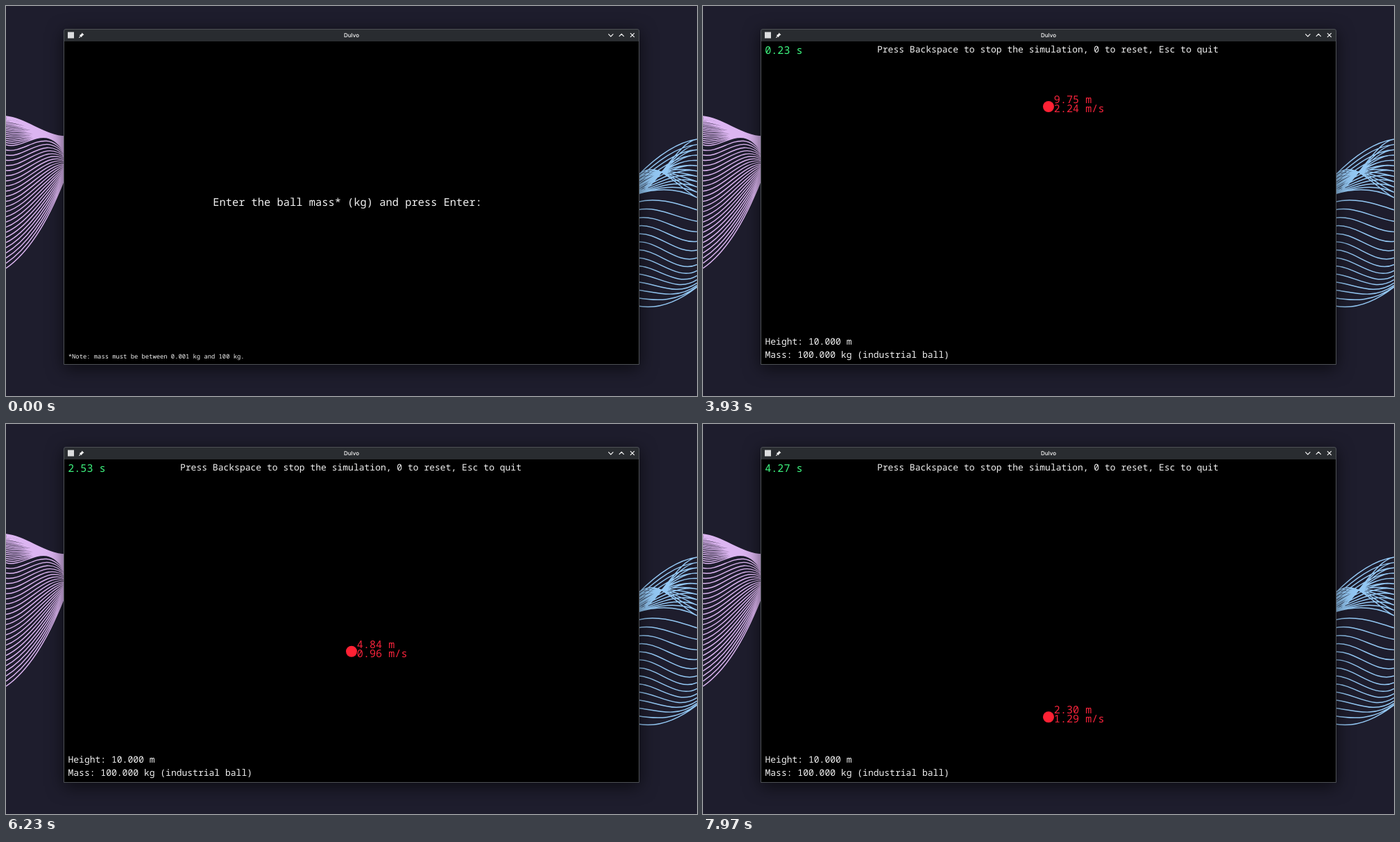
An HTML page that plays this animation: 996 px wide and 562 px high, repeating every 8 s.

```html
<!DOCTYPE html>
<html lang="en">
<head>
<meta charset="utf-8">
<title>Falling ball</title>
<style>
  html, body { margin: 0; width: 100%; height: 100%; overflow: hidden; background: #1e1d2d; }
  #stage { position: relative; width: 996px; height: 562px; overflow: hidden; }
  #window {
    position: absolute; left: 83px; top: 33px; width: 828px; height: 482px;
    border: 1px solid #4d5055; border-radius: 3px 3px 0 0;
    background: linear-gradient(#292c30 17px, #000 17px);
    box-shadow: 0 5px 24px rgba(0, 0, 0, .62);
  }
  svg { position: absolute; left: 0; top: 0; }
  text { font-family: "Roboto Mono", "Noto Sans Mono", monospace; fill: #f2f2f2; white-space: pre; text-rendering: geometricPrecision; }
  .title { font: 500 8px Inter, sans-serif; fill: #fcfcfc; text-anchor: middle; }
  .big { font-size: 15.4px; }
  .mid { font-size: 13.03px; }
  .small { font-size: 8.82px; }
  .readout { font-size: 15.15px; }
  #clock { fill: #3df57f; }
  #ball text { fill: #f5233b; }
  .wave { fill: none; stroke-width: 1.45; }
  .icon { fill: none; stroke: #fcfcfc; stroke-width: 1.1; }
</style>
</head>
<body>
<div id="stage">
  <svg width="996" height="562">
    <path id="lilac" class="wave" stroke="#dcb5f1"/>
    <path id="blue" class="wave" stroke="#93c7f3"/>
  </svg>
  <div id="window"></div>
  <svg width="996" height="562">
    <rect x="89" y="37.5" width="9" height="9" fill="#dcddde"/>
    <path d="M109.5 38.5l3 3-1.4.4-1.7 1.8-.4 1.5-3.2-3.2 1.5-.4 1.8-1.7z" fill="#fcfcfc"/>
    <path class="icon" d="M107.7 43.3L105.4 45.6M868.3 40.4l3.5 3.5 3.5-3.5M883.7 43.8l3.5-3.5 3.5 3.5M899.9 39.1l5.8 5.8m0-5.8l-5.8 5.8"/>
    <text class="title" x="498" y="45">Dulvo</text>

    <g id="form">
      <text id="prompt" class="big" x="298.2" y="288.4"></text>
      <text class="small" x="89.8" y="507.6">*Note: mass must be between 0.001 kg and 100 kg.</text>
    </g>

    <g id="simulation">
      <text id="clock" class="readout" x="89.2" y="68.6"></text>
      <text class="mid" x="251" y="67.2">Press Backspace to stop the simulation, 0 to reset, Esc to quit</text>
      <text class="mid" x="89.5" y="487.8">Height: 10.000 m</text>
      <text class="mid" x="89.5" y="506.7">Mass: 100.000 kg (industrial ball)</text>
      <g id="ball">
        <circle r="8" fill="#ff2134"/>
        <text id="height" class="readout" x="7.8" y="-5"></text>
        <text id="speed" class="readout" x="7.8" y="8"></text>
      </g>
    </g>
  </svg>
</div>
<script>
const $ = id => document.getElementById(id);
const mix = (a, b, u) => a + (b - a) * u;
const linear = u => u;
const easeIn = u => u ** 1.5;
const easeOut = u => 1 - (1 - u) ** 2;
const reverse = u => 1 - u;

// Lines between two curves, each given by its four Bézier heights.
// The left and right halves may advance at different rates.
function fan(x0, x1, count, from, to, left = linear, right = left) {
  let d = '';
  for (let i = 0; i < count; i++) {
    const u = i / (count - 1);
    const points = from.map((y, k) =>
      `${mix(x0, x1, k / 3)} ${mix(y, to[k], (k < 2 ? left : right)(u))}`);
    d += `M${points[0]}C${points.slice(1).join(' ')}`;
  }
  return d;
}

const lilac = { crest: [159, 162, 188, 188], fold: [200, 208, 163, 214], base: [378, 358, 320, 245] };
const blue = { crest: [245, 216, 196, 192], fold: [271, 262, 262, 276], base: [432, 438, 427, 405] };

$('lilac').setAttribute('d',
  fan(0, 86, 20, lilac.crest, lilac.fold, easeIn) +
  fan(0, 86, 25, lilac.fold, lilac.base));
$('blue').setAttribute('d',
  fan(910, 996, 12, blue.crest, blue.fold, easeOut, linear) +
  fan(910, 996, 12, blue.crest, blue.fold, linear, reverse) +
  fan(910, 996, 15, blue.fold, blue.base, linear, easeOut));

const PROMPT = 'Enter the ball mass* (kg) and press Enter: ';
const KEYS = [1370, 1470, 1630];
const START = 3700, LOOP = 8000, FPS = 30;
const GRAVITY = 9.81, DROP = 10, BOUNCE = 0.699;
const DELAY = 0.0054, CONTACT = 0.004;
const FLOOR = 508, SCALE = 37.25;

// Follows the ball from apex to apex until the arc that contains t.
function fall(t) {
  let apex = DELAY, top = DROP;
  for (;;) {
    const impact = Math.sqrt(2 * GRAVITY * top);
    const land = apex + impact / GRAVITY;
    if (t < land) break;
    const launch = BOUNCE * impact;
    top = launch ** 2 / (2 * GRAVITY);
    apex = land + CONTACT + launch / GRAVITY;
  }
  const speed = GRAVITY * (t - apex);
  return { speed, height: Math.max(0, top - speed ** 2 / (2 * GRAVITY)) };
}

function draw(ms) {
  const running = ms >= START + 30;
  $('form').style.display = running ? 'none' : '';
  $('simulation').style.display = running ? '' : 'none';
  if (!running) {
    $('prompt').textContent = PROMPT + '100'.slice(0, KEYS.filter(k => ms >= k).length);
    return;
  }
  const t = Math.floor((ms + 3.5) * FPS / 1000) / FPS - START / 1000;
  const { speed, height } = fall(t);
  $('clock').textContent = t.toFixed(2) + ' s';
  $('height').textContent = height.toFixed(2) + ' m';
  $('speed').textContent = speed.toFixed(2) + ' m/s';
  $('ball').setAttribute('transform', `translate(498 ${FLOOR - SCALE * height})`);
}

const begin = performance.now();
function tick() {
  draw((performance.now() - begin) % LOOP);
  requestAnimationFrame(tick);
}
tick();
</script>
</body>
</html>
```
